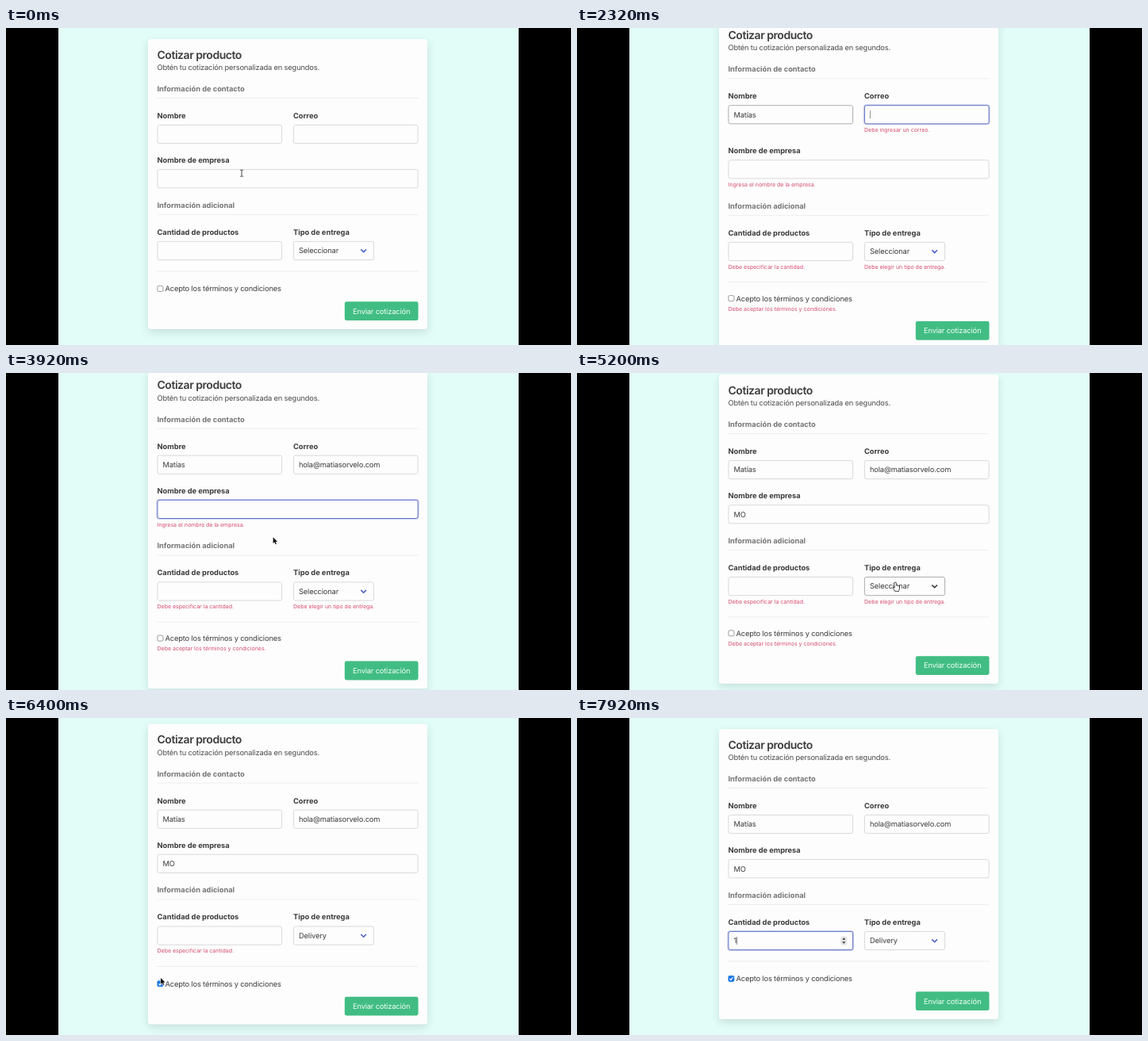
These frames come from a looping animation (712x400 px, 8000 ms). An HTML page with a canvas:

```html
<!DOCTYPE html>
<html lang="es">
<head>
<meta charset="utf-8">
<title>Cotizar producto</title>
<style>
html, body { margin: 0; width: 100%; height: 100%; overflow: hidden; background: #000; }
canvas { display: block; }
</style>
</head>
<body>
<canvas id="stage" width="712" height="400"></canvas>
<script>
const ctx = document.getElementById('stage').getContext('2d');
const LOOP = 8000, STEP = 80;
const ROW_ERROR = 12.8, TERMS_ERROR = 11;
const INK = '#3b3b3b', BLUE = '#485fc7', FOCUS_LINE = '#6070c2', LINE = '#d9d9d9', HOVER_LINE = '#adadad';
const CARD = '#fdfdfd', DANGER = '#d64a70';

// [time, x, y] of the pointer
const pointerPath = [
  [0, 297, 183], [80, 297, 183], [640, 472, 360], [1000, 472, 360], [1600, 265, 112],
  [3200, 265, 112], [3360, 300, 175], [3440, 300, 175], [3880, 336.6, 207.3],
  [4720, 336.6, 207.3], [5120, 402, 267], [5440, 402, 267], [5840, 430.6, 288],
  [6000, 430.6, 288], [6320, 195, 328], [6440, 195, 328], [6840, 340, 275], [LOOP, 340, 275]
];
const pointerHidden = [[1840, 3200], [4480, 4720], [7840, LOOP]];
const focusChanges = [
  [0, ''], [1800, 'name'], [2240, 'email'], [3380, 'company'], [4960, ''],
  [5400, 'type'], [6400, 'terms'], [6880, 'quantity']
];
const keyPresses = [2160, 3300, 4640, 7000, 7880];

const within = (t, [from, to]) => t >= from && t < to;
const typed = (text, t, start, pace) =>
  text.slice(0, Math.max(0, Math.floor((t - start) / pace) + 1));

function pointerAt(t) {
  const i = pointerPath.findIndex(p => p[0] > t);
  const [t0, x0, y0] = pointerPath[i - 1], [t1, x1, y1] = pointerPath[i];
  const u = (t - t0) / (t1 - t0), k = u * u * (3 - 2 * u);
  return { x: x0 + (x1 - x0) * k, y: y0 + (y1 - y0) * k };
}

function stateAt(t) {
  const [focusTime, focus] = focusChanges.filter(f => f[0] <= t).pop();
  const lastAction = Math.max(focusTime, ...keyPresses.filter(k => k <= t));
  const s = {
    focus,
    caret: (t - lastAction) % 1060 < 530 || within(t, [2420, 3300]),
    pointer: pointerAt(t),
    hidden: pointerHidden.some(span => within(t, span)),
    name: typed('Matías', t, 1840, 55),
    email: typed('hola@matiasorvelo.com', t, 2420, 42),
    company: typed('MO', t, 4480, 120),
    quantity: t < 7000 ? '' : t < 7880 ? '0' : '1',
    open: within(t, [5440, 6000]),
    type: t < 6000 ? 'Seleccionar' : 'Delivery',
    agreed: t >= 6400
  };
  const check = (valid, message) => t >= 800 && !valid ? message : '';
  s.errors = {
    name: check(s.name, 'Debe ingresar un nombre.'),
    email: check(s.email.length > 5, 'Debe ingresar un correo.'),
    company: check(s.company, 'Ingresa el nombre de la empresa.'),
    quantity: check(s.quantity > 0, s.quantity ? 'quantity must be greater than 0' : 'Debe especificar la cantidad.'),
    type: check(t >= 6000, 'Debe elegir un tipo de entrega.'),
    terms: check(s.agreed, 'Debe aceptar los términos y condiciones.')
  };
  return s;
}

// y is the middle of the capital letters
function text(str, x, y, { size = 9.3, weight = 400, color = INK, spacing = -0.017 } = {}) {
  ctx.font = `${weight} ${size}px Inter, sans-serif`;
  ctx.letterSpacing = size * spacing + 'px';
  ctx.textRendering = 'geometricPrecision';
  ctx.fillStyle = color;
  ctx.fillText(str, x, y + size * 0.36);
  return ctx.measureText(str).width;
}
const label = (str, y, x = 190.5, color = INK) =>
  text(str, x, y, { weight: 700, color, spacing: -0.003 });
const errorText = (str, x, y) => text(str, x, y, { size: 7, color: DANGER, spacing: 0 });

function box(x, y, w, h, r, fill, stroke, lineWidth = 1) {
  ctx.beginPath();
  ctx.roundRect(x, y, w, h, r);
  if (fill) { ctx.fillStyle = fill; ctx.fill(); }
  if (stroke) { ctx.strokeStyle = stroke; ctx.lineWidth = lineWidth; ctx.stroke(); }
}
function path(points, { fill, stroke, width = 1, close = false }) {
  ctx.beginPath();
  points.forEach(([x, y]) => ctx.lineTo(x, y));
  if (close) ctx.closePath();
  ctx.lineJoin = 'round';
  if (stroke) { ctx.strokeStyle = stroke; ctx.lineWidth = width; ctx.stroke(); }
  if (fill) { ctx.fillStyle = fill; ctx.fill(); }
}
function rule(y) {
  ctx.fillStyle = '#eeeeee';
  ctx.fillRect(190.5, y - 0.5, 329, 1);
}
function withShadow(color, blur, offset, draw) {
  ctx.save();
  Object.assign(ctx, { shadowColor: color, shadowBlur: blur, shadowOffsetY: offset });
  draw();
  ctx.restore();
}

const over = ({ x, y }, left, width, mid, half = 11.7) =>
  x >= left && x <= left + width && Math.abs(y - mid) < half;

function frameBox(s, key, x, w, mid) {
  const focused = s.focus === key;
  const hovered = key !== 'company' && over(s.pointer, x, w, mid);
  if (focused) box(x, mid - 11.8, w, 23.6, 2.6, null, 'rgba(72,95,199,.25)', 2.4);
  box(x + 0.4, mid - 11.6, w - 0.8, 23.2, 2.4, CARD, focused ? FOCUS_LINE : hovered ? HOVER_LINE : LINE);
  errorText(s.errors[key], x, mid + 19.2);
}
function input(s, key, x, w, mid) {
  frameBox(s, key, x, w, mid);
  const width = text(s[key], x + 7, mid);
  if (s.focus === key && s.caret) {
    ctx.fillStyle = '#777';
    ctx.fillRect(x + 7 + width, mid - 5, 0.8, 10);
  }
}

function stepper(x, mid) {
  box(x - 4, mid - 5.5, 8, 11, 2, '#e4e4e4');
  for (const dir of [-1, 1])
    path([[x - 2, mid + dir * 1.3], [x + 2, mid + dir * 1.3], [x, mid + dir * 3.8]], { fill: '#333', close: true });
}

function select(s, mid) {
  frameBox(s, 'type', 362, 102, mid);
  text(s.type, 369, mid);
  const arrow = over(s.pointer, 362, 102, mid) ? '#333' : BLUE;
  path([[447.3, mid - 1.6], [450.6, mid + 1.7], [453.9, mid - 1.6]], { stroke: arrow, width: 1.6 });
}

function menu(s, mid) {
  withShadow('rgba(0,0,0,.3)', 10, 3, () => box(357, mid - 9.6, 103, 51.6, 4.5, '#dddfe1'));
  box(357, mid - 9.6, 103, 51.6, 4.5, null, 'rgba(0,0,0,.12)', 0.6);
  const active = s.pointer.y < mid + 8 ? 0 : 1;
  ['Seleccionar', 'Delivery', 'Recojo en tienda'].forEach((item, i) => {
    const y = mid + 0.9 + i * 15.4;
    if (i === active) box(360, y - 7.7, 96.8, 15.2, 2.8, '#3f92fa');
    const color = i === active ? '#fff' : '#2e2e2e';
    text(item, 371, y, { color });
    if (!i) path([[363.2, y + 0.5], [365, y + 2.7], [368, y - 2.7]], { stroke: color, width: 1.1 });
  });
}

function checkbox(checked, mid) {
  box(190.9, mid - 3.6, 7, 7, 1.4, checked ? '#1473e6' : '#fff', checked ? '#1473e6' : '#858585', 0.8);
  if (checked) path([[192.4, mid], [193.9, mid + 1.7], [196.4, mid - 2]], { stroke: '#fff', width: 1.2 });
}

function pointer({ x, y }, shape) {
  ctx.save();
  ctx.translate(x, y);
  if (shape === 'beam') {
    path([[-2, -4], [0, -3.4], [2, -4]], { stroke: '#333', width: 0.8 });
    path([[-2, 4.5], [0, 3.9], [2, 4.5]], { stroke: '#333', width: 0.8 });
    path([[0, -3.4], [0, 3.9]], { stroke: '#333', width: 0.9 });
  } else if (shape === 'hand') {
    path([[-1.7, -2], [-0.9, -2.7], [0, -2], [0.3, 1.2], [3.4, 1.8], [4.2, 3], [3.4, 8], [-1, 8],
      [-3.6, 4.4], [-3.2, 3.4], [-1.3, 4.6]], { fill: '#fff', stroke: '#222', width: 1.5, close: true });
  } else {
    path([[0, 0], [0, 7.8], [1.8, 6.2], [3, 9], [4.3, 8.4], [3.1, 5.7], [5.5, 5.6]],
      { fill: '#111', stroke: '#fff', width: 1.2, close: true });
  }
  ctx.restore();
}

function draw(t) {
  const s = stateAt(t), e = s.errors;
  const grow = [e.name || e.email, e.company, e.quantity || e.type].map(err => err ? ROW_ERROR : 0);
  const extra = grow[0] + grow[1] + grow[2] + (e.terms ? TERMS_ERROR : 0);
  const top = -extra / 2;
  const second = top + grow[0], third = second + grow[1], foot = third + grow[2];
  const nameY = top + 134, companyY = second + 190.2, optionsY = third + 281;
  const termsY = foot + 329 - (e.terms ? 1.5 : 0), buttonY = 357.2 + extra / 2;

  ctx.fillStyle = '#000';
  ctx.fillRect(0, 0, 712, 400);
  ctx.fillStyle = '#e2fdf8';
  ctx.fillRect(66, 0, 580, 400);
  withShadow('rgba(10,10,10,.12)', 11, 4, () => box(179, top + 14, 352, 366 + extra, 3.5, CARD));

  text('Cotizar producto', 190.5, top + 33.6, { size: 14, weight: 600, spacing: -0.033 });
  text('Obtén tu cotización personalizada en segundos.', 190.5, top + 49.6, { color: '#4a4a4a' });
  label('Información de contacto', top + 76.6, 190.5, '#757575');
  rule(top + 88.5);
  label('Nombre', top + 110.7);
  label('Correo', top + 110.7, 362);
  input(s, 'name', 190.5, 157.5, nameY);
  input(s, 'email', 362, 157.5, nameY);
  label('Nombre de empresa', second + 167);
  input(s, 'company', 190.5, 329, companyY);

  label('Información adicional', third + 223.5, 190.5, '#757575');
  rule(third + 235.5);
  label('Cantidad de productos', third + 257.5);
  label('Tipo de entrega', third + 257.5, 362);
  input(s, 'quantity', 190.5, 157.5, optionsY);
  if (s.focus === 'quantity') stepper(336.3, optionsY);
  select(s, optionsY);

  rule(foot + 307);
  checkbox(s.agreed, termsY);
  text('Acepto los términos y condiciones', 200.5, termsY);
  errorText(e.terms, 190.5, termsY + 13);
  const onButton = over(s.pointer, 427, 92, buttonY);
  box(426.8, buttonY - 11.9, 92.7, 23.8, 2.4, onButton ? '#3ab57b' : '#41bd83');
  text('Enviar cotización', 437, buttonY, { color: '#f4fff9' });

  if (s.open) menu(s, optionsY);
  if (s.hidden) return;
  const { x } = s.pointer;
  const inField = over(s.pointer, 190.5, 329, companyY) || over(s.pointer, 190.5, 157.5, nameY) ||
    over(s.pointer, 362, 157.5, nameY) || (over(s.pointer, 190.5, 157.5, optionsY) && x < 332);
  const clickable = onButton || over(s.pointer, 362, 102, optionsY) || over(s.pointer, 190.5, 156, termsY, 5);
  pointer(s.pointer, s.open ? 'arrow' : inField ? 'beam' : clickable ? 'hand' : 'arrow');
}

function tick() {
  const t = performance.now() % LOOP;
  draw(Math.floor(t / STEP) * STEP);
  requestAnimationFrame(tick);
}
tick();
</script>
</body>
</html>
```
